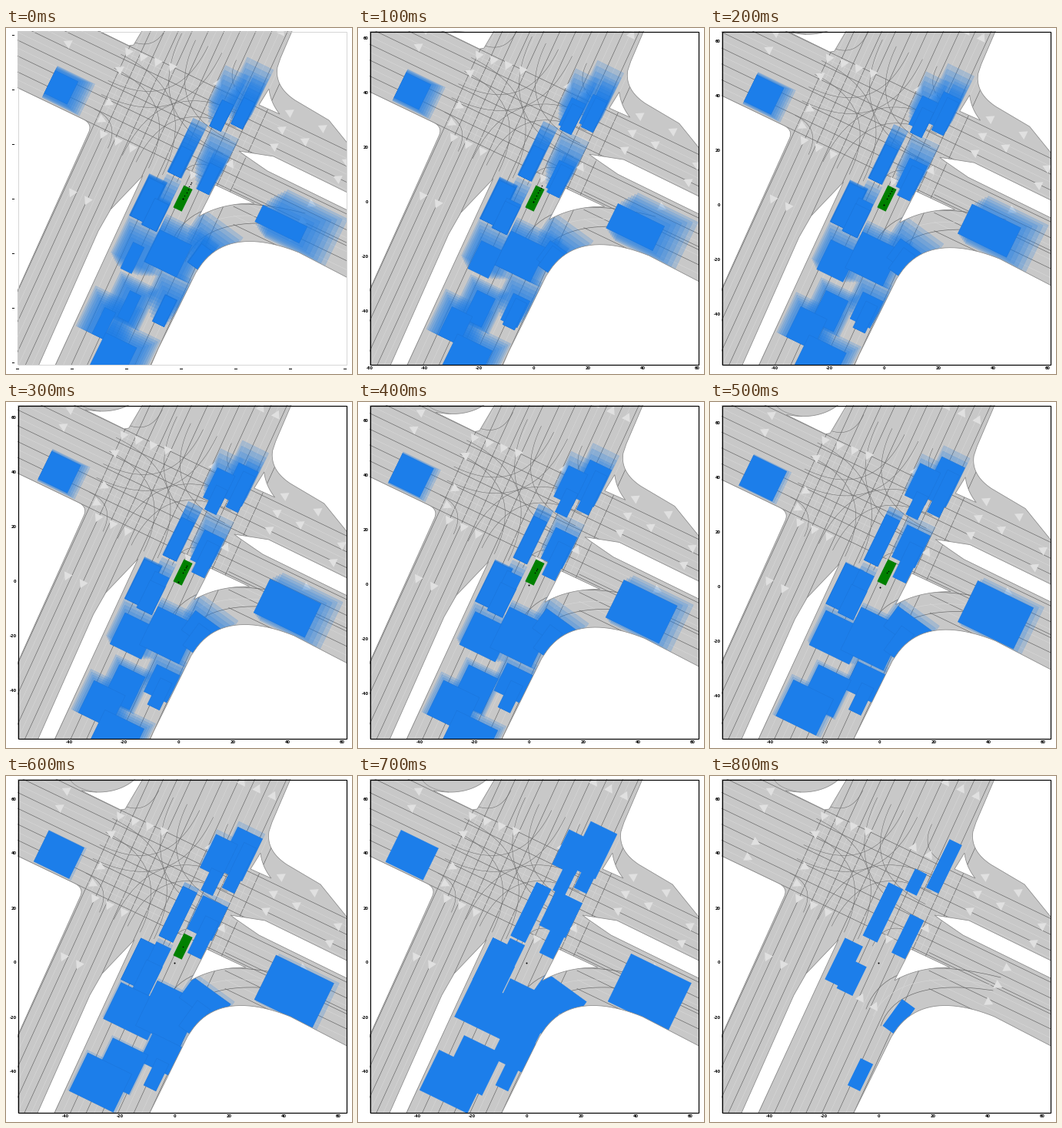
Recreate the animation shown at these times as a matplotlib script. Size 450 by 450 pixels, loop 1.2 s.

```python
import numpy as np
import matplotlib.pyplot as plt
from matplotlib.animation import FuncAnimation
from matplotlib.patches import Polygon, Rectangle

SIZE, DPI = 450, 100
LEFT, RIGHT, TOP, BOTTOM = 15, 443, 4, 438
PX = 72 / DPI
STEPS = 12
LAST = 7                      # final step of the prediction horizon
STOP = 6                      # step at which the car has halted
ORIGIN = np.array([219.3, 243.0])
TRAVEL = np.array([11.0, -21.0])
TICK = 71.0
NORTH, EAST = 64, -26         # road headings in degrees
SLOPE_X, SLOPE_Y = 0.458, 0.48

ROAD, LANE, PALE, EDGE = "#c8c8c8", "#666666", "#d6d6d6", "#8c8c8c"
BLUE, RIM, GREEN = "#1c7eea", "#1a72d6", "#008000"

fig = plt.figure(figsize=(SIZE / DPI, SIZE / DPI), dpi=DPI, facecolor="white")
ax = fig.add_axes([LEFT / SIZE, 1 - BOTTOM / SIZE,
                   (RIGHT - LEFT) / SIZE, (BOTTOM - TOP) / SIZE])
ax.set(facecolor=ROAD, xticks=[], yticks=[])
for spine in ax.spines.values():
    spine.set_visible(False)
page = fig.add_axes([0, 0, 1, 1])
page.set(xlim=(0, SIZE), ylim=(SIZE, 0))
page.axis("off")


def heading(angle):
    """Unit vectors ahead and to the right, with y pointing down."""
    a = np.radians(angle)
    return np.array([np.cos(a), -np.sin(a)]), np.array([np.sin(a), np.cos(a)])


def box(rear, angle, back, front, left, right):
    ahead, side = heading(angle)
    return [rear + u * ahead + v * side
            for u, v in ((back, left), (front, left), (front, right), (back, right))]


def bezier(*points):
    """Bezier curve of any degree by repeated interpolation."""
    u = np.linspace(0, 1, 24)[:, None]
    pts = [np.array(p, float) for p in points]
    while len(pts) > 1:
        pts = [a * (1 - u) + b * u for a, b in zip(pts, pts[1:])]
    return pts[0]


def line(points, color=LANE, width=0.65, z=1):
    ax.plot(*np.array(points).T, color=color, lw=width * PX, zorder=z)


def void(*points):
    """Area off the road; it also cuts off whatever reaches past the kerb."""
    ax.add_patch(Polygon(points, fc="white", ec=EDGE, lw=0.8 * PX, zorder=7))


# --- lanes ------------------------------------------------------------------
def north_lane(x, color):
    line([(x - SLOPE_X * 60, 498), (x + SLOPE_X * 470, -32)], color)


def east_lane(y, color, start=-20):
    line([(start, y + SLOPE_Y * (start - 15)), (470, y + SLOPE_Y * 455)], color)


def lanes(draw, first, last, count, **options):
    """Dark lane borders with a pale centre line between them."""
    for i, p in enumerate(np.linspace(first, last, 2 * count + 1)):
        draw(p, PALE if i % 2 else LANE, **options)


lanes(north_lane, -30, 42, 4)
lanes(north_lane, 63, 187, 6)
lanes(east_lane, -20, 104, 6)
lanes(east_lane, 100, 147, 2, start=285)

# Left and right turns across the junction, the same for all four arms.
CENTER, ARM = np.array([205, 120]), 88
for arm in range(4):
    ahead, side = heading(NORTH + 90 * arm)
    for s in (9, 29):
        line(bezier(*[CENTER + u * side + v * ahead
                      for u, v in ((s, -ARM), (s, s), (-ARM, s))]), width=0.5)
    line(bezier(*[CENTER + u * side + v * ahead
                  for u, v in ((50, -ARM), (50, -50), (ARM, -50))]), width=0.5)

line(bezier((203, 303), (225, 245), (290, 240), (378, 262)))
line(bezier((222, 325), (240, 272), (310, 270), (368, 279)))
line(bezier((212, 312), (235, 262), (300, 258), (365, 272)), PALE)

# --- kerbs ------------------------------------------------------------------
void((-12, 91), (88, 139), *bezier((90, 140), (102, 146), (96, 158)), (-12, 398))
void((167, 213), (125, 257), (109, 285), (18, 490), (39, 490), (63, 438))
void((160, 500), (187, 438), (236, 339),
     *bezier((240, 333), (268, 290), (318, 292), (370, 313)), (480, 370), (480, 500))
void((384, -30), (370, 4), (346, 60), *bezier((342, 72), (338, 97), (365, 115)),
     (409, 141), (443, 183), (480, 230), (480, -30))
void((292, 181), (337, 188), (480, 258), (480, 281), (329, 207), (300, 187))
void((98, 19), *bezier((100, 19), (125, 24), (150, 20), (168, 4)), (178, 4), (155, 43), (149, 44))
void((261, 225), (312, 249), *bezier((310, 249), (270, 249), (240, 266)))
void((331, 100), *bezier((331, 100), (333, 118), (345, 133)), (318, 121))
line(bezier((83, 4), (90, 17), (118, 21)), EDGE, z=8)


# --- direction marks: evenly spaced rows of triangles -------------------------
def marks(angle, x, y, dx=0, dy=0, count=1):
    ahead, side = heading(angle)
    for i in range(count):
        p = np.array([x + i * dx, y + i * dy])
        ax.add_patch(Polygon([p + 7 * ahead, p - 3.5 * ahead + 6 * side, p - 3.5 * ahead - 6 * side],
                             fc="#e0e0e0", ec="none", zorder=4))


WEST, SOUTH = EAST + 180, NORTH + 180
marks(WEST, 79, 19, -9, 22, 2)
marks(WEST, 358, 131, -10, 22, 3)
marks(WEST, 432, 195, -11, 22, 2)
marks(WEST, 401, 151, -23, 17, 2)
marks(WEST, 137, 75)
marks(EAST, 59, 86, -10, 20, 2)
marks(EAST, 123, 118, -10, 22, 2)
marks(EAST, 386, 250, -12, 22, 3)
marks(SOUTH, 148, 52, 19, 6.5, 4)
marks(SOUTH, 115, 159, 19, 9, 3)
marks(SOUTH, 75, 235, 20, 10, 2)
marks(SOUTH, 232, 212)
marks(NORTH, 307, 8, 20, 9, 3)
marks(NORTH, 265, 93, 20, 10, 2)
marks(NORTH, 196, 289, 18, 11, 2)
marks(NORTH, 281, 198)
ax.plot(*ORIGIN, "o", color="black", ms=2 * PX, mew=0, zorder=9)


# --- predicted occupancy ------------------------------------------------------
class Agent:
    """A car whose reachable box grows from its own size to `reach`.

    Boxes are (back, front, left, right) measured from the rear bumper.
    `trail` is the (length, width) of the lane strip that stays certain.
    """

    def __init__(self, x, y, reach, size=(38, 16), angle=NORTH, trail=None, until=LAST):
        self.rear, self.angle = np.array([x, y]), angle
        self.size, self.reach = size, reach
        self.trail, self.until = trail, until

    def strip(self, u=1):
        (l0, w0), (l1, w1) = self.size, self.trail
        length, width = l0 + (l1 - l0) * u, w0 + (w1 - w0) * u
        return box(self.rear, self.angle, 0, length, -width / 2, width / 2)

    def shapes(self, step):
        u = step / LAST
        length, width = self.size
        first = np.array([0, length, -width / 2, width / 2])
        grow = np.array([u, u, u ** 0.7, u ** 0.7])
        yield box(self.rear, self.angle, *(first + (self.reach - first) * grow))
        if self.trail:
            yield self.strip(u)


agents = [
    Agent(46, 91, (0, 54, -23, 23), size=(33, 33), angle=EAST),
    Agent(318, 262, (20, 107, -44, 25), size=(64, 24), angle=EAST),
    Agent(289, 149, (22, 87, -27, 11), trail=(70, 18)),
    Agent(261, 152, (30, 80, -24, 9), trail=(31, 17)),
    Agent(208, 212, (0, 77, -10, 10), trail=(77, 21)),
    Agent(245, 234, (32, 82, -26, 12), trail=(56, 20)),
    Agent(161, 270, (0, 60, -13, 13), size=(55, 22), trail=(60, 26)),
    Agent(175, 281, (0, 73, -10, 11), size=(38, 20), trail=(42, 23)),
    Agent(145, 337, (13, 68, -28, 41)),
    Agent(190, 335, (0, 68, -24, 42), size=(46, 46)),
    Agent(233, 331, (35, 68, -34, 30), size=(30, 18), angle=54, trail=(43, 21)),
    Agent(187, 406, (30, 71, -30, 17), trail=(39, 18)),
    Agent(141, 400, (-5, 55, -30, 25)),
    Agent(108, 422, (0, 58, -31, 38)),
    Agent(117, 472, (10, 72, -20, 46), size=(50, 45), until=4),
]


def remaining(step):
    """Offset of the map from its resting place while the car brakes."""
    return TRAVEL * max(0, 1 - step / STOP) ** 1.22


live = []


def fill(points, color=BLUE, rim="none", alpha=1.0, z=6):
    live.append(ax.add_patch(Polygon(points, fc=color, ec=rim, lw=0.4 * PX, alpha=alpha, zorder=z)))


def draw_agents(step):
    if step > LAST:
        for agent in agents:
            if agent.trail:
                fill(agent.strip())
        return
    for k in range(LAST, step - 1, -1):
        for agent in agents:
            if step <= agent.until:
                for points in agent.shapes(k):
                    fill(points, rim=RIM if k < LAST else BLUE, alpha=1 if k == step else 0.2)


def draw_ego(step, shift):
    if step > STOP:
        return
    fill(box(np.array([223, 236]) - shift, NORTH, 0, 32, -6.2, 6.2), GREEN, z=8)
    dots = np.array([ORIGIN + TRAVEL - remaining(k) for k in range(step, STOP + 1)])
    live.extend(ax.plot(*dots.T, "o", color="black", ms=1.5 * PX, mew=0, zorder=9))


def draw_axes(step, shift):
    faint = step == 0
    live.append(page.add_patch(Rectangle((LEFT + 0.5, TOP + 0.5), RIGHT - LEFT - 0.5, BOTTOM - TOP - 0.5,
                                         fill=False, ec="#cccccc" if faint else "black",
                                         lw=(0.8 if faint else 1.2) * PX)))
    x0, y0 = ORIGIN + shift
    style = dict(fontsize=5 * PX, fontweight="bold", family="DejaVu Sans", va="center")
    for n in range(-3, 4):
        x, y = x0 + n * TICK, y0 - n * TICK
        if faint:
            live.extend(page.plot([x - 4, x - 1], [442.5] * 2, color="black", lw=PX))
            live.extend(page.plot([8, 10], [y] * 2, color="black", lw=PX))
            continue
        if LEFT < x < RIGHT:
            live.append(page.text(x, 442.3, str(20 * n), ha="center", **style))
        if TOP < y < BOTTOM:
            live.append(page.text(13.5, y, str(20 * n), ha="right", **style))


def update(i):
    while live:
        live.pop().remove()
    shift = remaining(i)
    ax.set_xlim(LEFT - shift[0], RIGHT - shift[0])
    ax.set_ylim(BOTTOM - shift[1], TOP - shift[1])
    step = min(i, LAST + 1)
    draw_agents(step)
    draw_ego(step, shift)
    draw_axes(step, shift)
    return []


anim = FuncAnimation(fig, update, frames=STEPS, interval=100, repeat=True,
                     repeat_delay=0, init_func=lambda: [])
plt.show()
```
